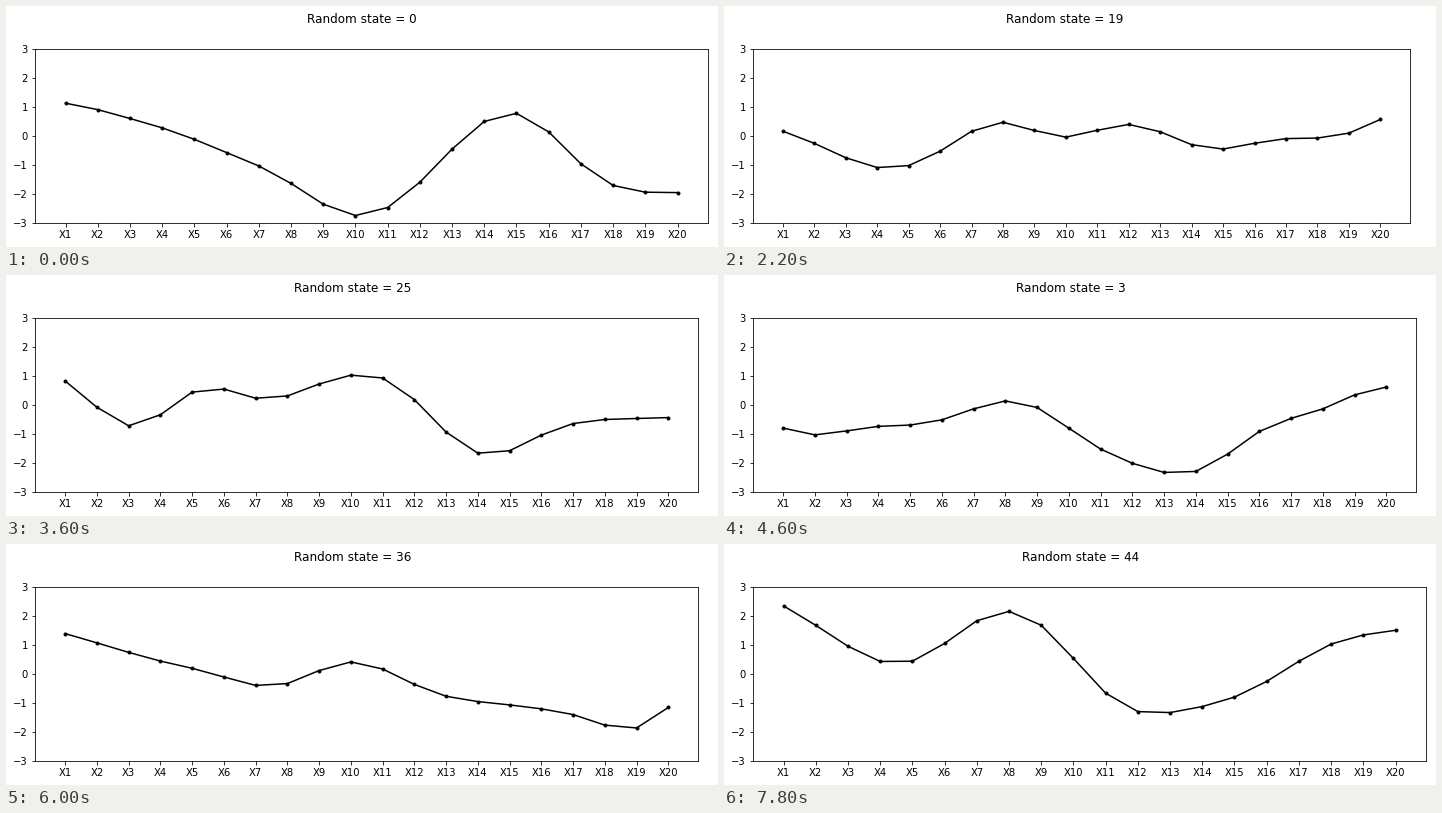
Animation of 712x241 px, one loop 8000 ms. Source, as a matplotlib script:

```python
import numpy as np
import matplotlib.pyplot as plt
from matplotlib.animation import FuncAnimation

W, H, DPI = 712, 241, 72
N = 20                      # points per curve
SCALE = 2.0                 # length scale of the RBF kernel, in points
LEFT, RIGHT, BOTTOM, HEIGHT = 29, 702.11, 24.25, 174
CENTER, TITLE_TOP = 356.15, 7.2

# Eigenvector signs are arbitrary; the key points of one draw settle them
KEY_SEED = 25
KEY_POINTS = [.82, -.08, -.72, -.34, .44, .54, .23, .31, .72, 1.02,
              .93, .18, -.93, -1.67, -1.58, -1.04, -.65, -.50, -.47, -.44]


def noise(seed):
    return np.random.RandomState(seed).standard_normal(N)


def kernel_factor():
    """Matrix that turns white noise into draws of a Gaussian process."""
    idx = np.arange(N)
    cov = np.exp(-0.5 * ((idx[:, None] - idx) / SCALE) ** 2)
    val, vec = np.linalg.eigh(cov)
    val, vec = val[::-1], vec[:, ::-1]
    sign = np.sign(noise(KEY_SEED) * (KEY_POINTS @ vec))
    return (sign * np.sqrt(np.clip(val, 0, None)))[:, None] * vec.T


def label_inset(y):
    """Extra left margin taken by decimals in automatic y tick labels."""
    raw = 1.1 * np.ptp(y) / 8
    if raw > 0.5:
        return 0
    return 15.95 if 0.2 < raw <= 0.25 else 9.65


factor = kernel_factor()
states = sorted(range(50), key=str)[:40]

fig = plt.figure(figsize=(W / DPI, H / DPI), dpi=DPI, facecolor="white")
ax = fig.add_axes([LEFT / W, BOTTOM / H, (RIGHT - LEFT) / W, HEIGHT / H])
x = np.arange(1, N + 1)
line, = ax.plot(x, np.zeros(N), "k.-")
margin = 0.05 * (N - 1)
ax.set_xlim(1 - margin, N + margin)
ax.set_ylim(-3, 3)
ax.set_xticks(x, [f"X{i}" for i in x])
ax.set_yticks(range(-3, 4))
title = fig.text(CENTER / W, 1 - TITLE_TOP / H, "", size=12,
                 ha="center", va="top")


def draw(i):
    y = noise(states[i]) @ factor
    inset = label_inset(y)
    ax.set_position([LEFT / W, BOTTOM / H,
                     (RIGHT - inset - LEFT) / W, HEIGHT / H])
    line.set_ydata(y)
    title.set_text(f"Random state = {states[i]}")
    title.set_x((CENTER - inset) / W)
    return line, title


anim = FuncAnimation(fig, draw, frames=len(states), interval=200,
                     repeat=True, repeat_delay=0, blit=False)
plt.show()
```
